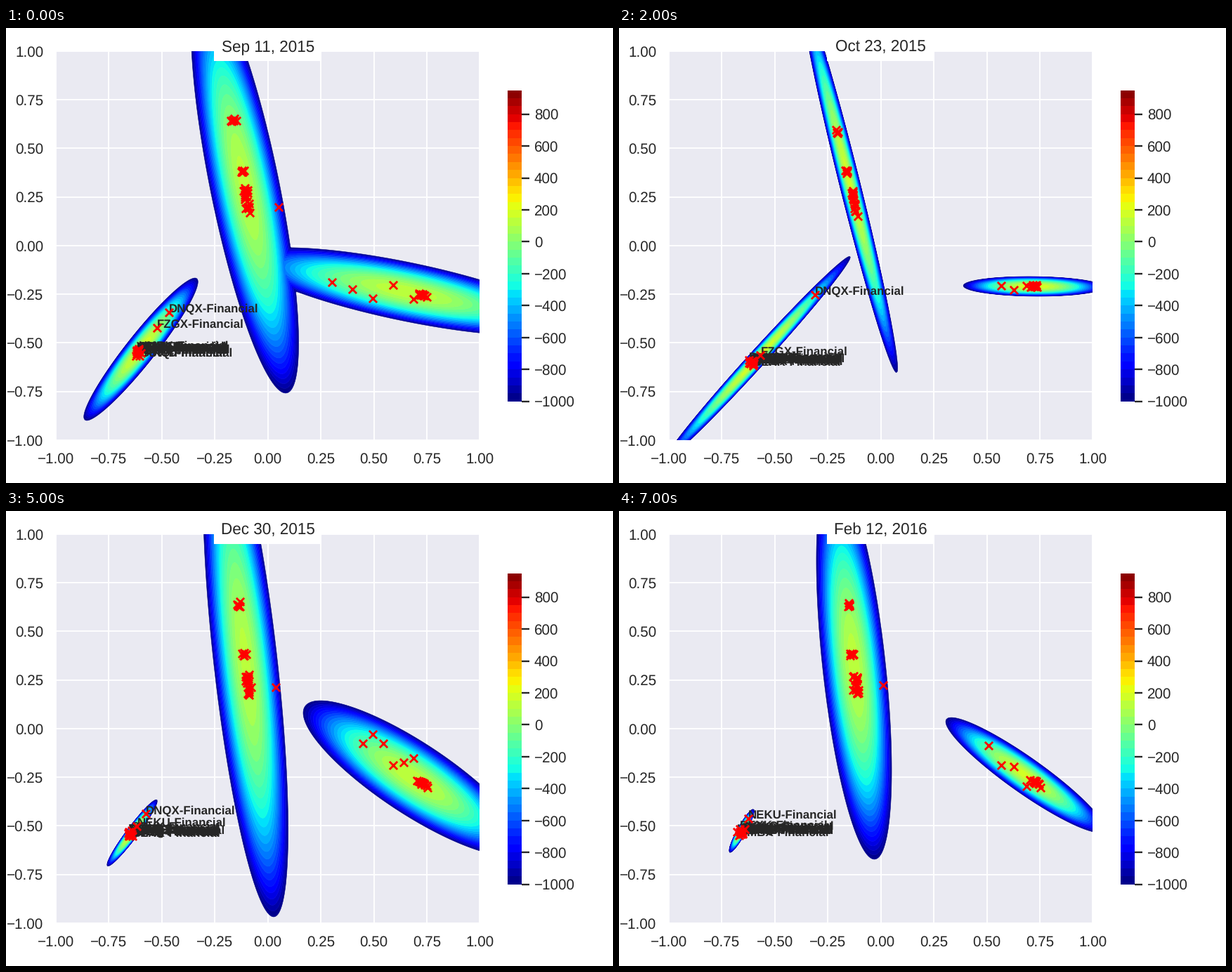
Recreate the animation shown at these times as a matplotlib script. Size 864x648 px, loop 8 s.

```python
import matplotlib.pyplot as plt
import numpy as np
from matplotlib.animation import FuncAnimation
from matplotlib.patches import Rectangle

W, H, DPI = 864, 648, 135
INK = "#262626"
CX, CY, SX, SY = 372.7, 309.8, 301.6, 277.0  # stage position of (0, 0) and pixels per unit
LEVELS = np.arange(-1000, 951, 50)
TAGS = ["VEKB", "RUDM", "NOLQ", "BEXK", "GUWD", "PIZV", "KARQ", "UMBX",
        "SOVK", "DYLQ", "TEWB", "XARM"]

plt.rcParams.update({
    "font.family": "Liberation Sans", "text.color": INK, "text.hinting": "none",
    "xtick.labelcolor": INK, "ytick.labelcolor": INK,
    "xtick.labelsize": 11, "ytick.labelsize": 11,
})


def to_data(x, y):
    return (np.asarray(x) - CX) / SX, (CY - np.asarray(y)) / SY


gx, gy = np.meshgrid(np.linspace(CX - SX, CX + SX, 320),
                     np.linspace(CY - SY, CY + SY, 320))


class Blob:
    """Ellipse in stage pixels: (ux, uy) reaches a tip, w is half the chord at the centre."""

    def __init__(self, cx, cy, ux, uy, w):
        self.values = np.array([cx, cy, ux, uy, w], float)
        self.c, self.w = np.array([cx, cy]), w
        self.u = np.array([ux, uy])
        self.v = np.array([w, 0] if abs(uy) > abs(ux) else [0, w])

    def at(self, along, across=0.0):
        return self.c + np.outer(along, self.u) + np.outer(across, self.v)

    def on_axis_y(self, y):
        return self.at((np.asarray(y) - self.c[1]) / self.u[1])

    def on_axis_x(self, x):
        return self.at((np.asarray(x) - self.c[0]) / self.u[0])

    def field(self):
        """Paraboloid that falls to -1000 on the rim; small blobs peak higher."""
        axes = np.column_stack([self.u, self.v])
        d = np.stack([gx - self.c[0], gy - self.c[1]])
        p = np.tensordot(np.linalg.inv(axes), d, 1)
        peak = min(230, 480 - 37 * np.log(abs(np.linalg.det(axes))))
        return peak - (peak + 1000) * (p ** 2).sum(axis=0)


def between(a, b):
    return Blob(*np.sign(a.values) * np.sqrt(np.abs(a.values * b.values)))


def tall_marks(blob, rng):
    """Four knots along the axis and, on a wide blob, one mark near the rim."""
    y = np.concatenate([rng.normal(mid, spread, n) for mid, spread, n in
                        [(157 - blob.w / 2, 2, 6), (205, 1.5, 5), (238, 5, 10), (257, 5, 7)]])
    marks = blob.on_axis_y(y) + rng.normal(0, 1 + blob.w / 30, (len(y), 2)) * [1, 0.3]
    return np.vstack([marks, blob.at(0.1, 0.85)]) if blob.w > 20 else marks


def wide_marks(blob, rng):
    """A tight knot and a few stragglers towards the left tip."""
    knot = blob.on_axis_x(rng.normal(592, 4, 11)) + rng.normal(0, 1, (11, 2))
    n = int(2 + blob.w / 12)
    start = -0.46
    end = (580 - blob.c[0]) / blob.u[0]
    trail = blob.at(np.linspace(start, end, n), rng.uniform(-0.5, 0.5, n))
    return np.vstack([knot, trail])


scenes = []


def scene(date, tall, wide, slim, named):
    rng = np.random.default_rng(len(scenes) + 5)
    bank = slim.at(-0.05) + rng.normal(0, 3, (len(TAGS), 2))
    spots = np.vstack([slim.at(*spot) for spot in named.values()])
    marks = np.vstack([tall_marks(tall, rng), wide_marks(wide, rng), bank, spots])
    labels = list(zip(TAGS, bank)) + list(zip(named, spots))
    field = np.max([b.field() for b in (tall, wide, slim)], axis=0)
    scenes.append((date, field, marks, labels))


sep = Blob(340, 226, 58, 294, 50), Blob(570, 375.5, 230, 46, 42.5), Blob(192, 457.5, 77, -101.5, 26)
oct_ = Blob(328, 220, 67, 271, 15), Blob(590, 368, 100, 1, 14), Blob(197.5, 470, 131, -145, 16)
dec = Blob(330, 220, 54, 259, 14.5), Blob(587, 370, 87, 18, 7), Blob(184.5, 470, 18, -25, 10)
year_end = Blob(341, 215, 40, 363, 45.5), Blob(580, 380.5, 157, 93, 59.5), Blob(179.5, 458.5, 34.5, -47.5, 10)
jan = Blob(340, 215, 42, 353, 37), Blob(550, 371, 257, 99, 87), Blob(187, 449, 160, -76, 53.7)
feb = Blob(334.5, 220, 29, 276, 45), Blob(578, 376, 113, 76, 30.5), Blob(174.5, 455.5, 16.5, -31, 7)

# Named marks sit at (along, across) on the slim blob.
scene("Sep 11, 2015", *sep, {"DNQX": (0.52, 0), "FZGX": (0.3, 0)})
scene("Oct 02, 2015", *map(between, sep, oct_), {"DNQX": (0.57, 0), "FZGX": (0.15, 0)})
scene("Oct 23, 2015", *oct_, {"DNQX": (0.62, 0), "FZGX": (0.03, 0)})
scene("Nov 13, 2015", *map(between, oct_, dec), {"DNQX": (0.6, 0)})
scene("Dec 04, 2015", *dec, {"DNQX": (0.57, 0)})
scene("Dec 30, 2015", *year_end, {"DNQX": (0.57, 0), "NEKU": (0.2, 0)})
scene("Jan 22, 2016", *jan, {"FZGX": (0.26, -0.58)})
scene("Feb 12, 2016", *feb, {"NEKU": (0.57, 0)})

fig = plt.figure(figsize=(W / DPI, H / DPI), dpi=DPI, facecolor="white")


def panel(left, top, right, bottom):
    ax = fig.add_axes([left / W, 1 - bottom / H, (right - left) / W, (bottom - top) / H])
    for spine in ax.spines.values():
        spine.set_visible(False)
    return ax


ax = panel(CX - SX, CY - SY, CX + SX, CY + SY)
ax.set(xlim=(-1, 1), ylim=(-1, 1), facecolor="#EAEAF2")
ticks = np.arange(-1, 1.01, 0.25)
names = [f"{t:.2f}".replace("-", "\u2212") for t in ticks]
ax.set_xticks(ticks, names)
ax.set_yticks(ticks, names)
ax.tick_params(length=0, pad=9.5)
ax.set_axisbelow(True)
ax.grid(color="white", lw=1)

bar = panel(714, 88.6, 734, 531.6)
mids = (LEVELS[:-1] + LEVELS[1:]) / 2
bar.pcolormesh([0, 1], LEVELS, mids[:, None], cmap="jet", vmin=-1000, vmax=950)
bar.set_xticks([])
bar.yaxis.tick_right()
bar.set_yticks(np.arange(-1000, 801, 200))
bar.tick_params(length=6, width=1.25, pad=3.5, color=INK)

ax.add_patch(Rectangle((296 / W, 1 - 47 / H), 153 / W, 47 / H, fc="white", lw=0,
                       transform=fig.transFigure, clip_on=False, zorder=5))
title = ax.text(0, 1, "", ha="center", fontsize=12, zorder=6)
shown = []


def draw(i):
    for artist in shown:
        artist.remove()
    shown.clear()
    date, field, marks, labels = scenes[i]
    title.set_text(date)
    cs = ax.contourf(*to_data(gx, gy), field, levels=LEVELS, cmap="jet",
                     antialiased=True, zorder=1)
    cs.set_edgecolor("face")
    cs.set_linewidth(0.3)
    shown.append(cs)
    for tag, (x, y) in labels:
        shown.append(ax.text(*to_data(x, y), tag + "-Financial", fontsize=9,
                             weight="bold", zorder=3))
    shown.append(ax.scatter(*to_data(*marks.T), s=36, marker="x", c="red",
                            linewidths=1.5, zorder=4))
    return [*shown, title]


anim = FuncAnimation(fig, draw, frames=len(scenes), interval=1000, repeat=True,
                     init_func=lambda: draw(0), blit=False)
plt.show()
```
